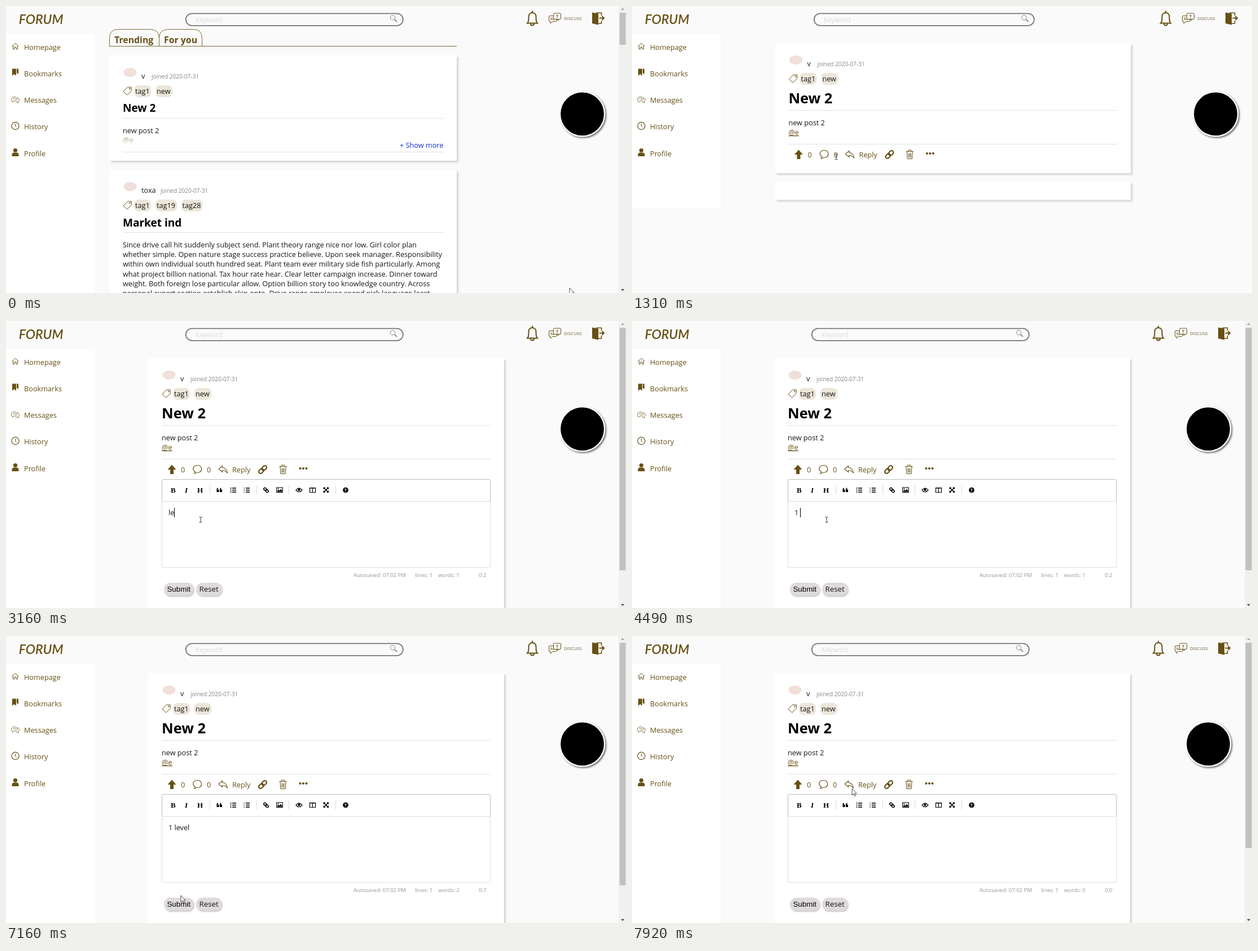
Recreate the animation shown at these times as an HTML page. Size 1099 px wide and 510 px high, loop 8 s.

```html
<!DOCTYPE html>
<html lang="en">
<head>
<meta charset="utf-8">
<title>Forum</title>
<style>
  html, body { margin: 0; width: 100%; height: 100%; overflow: hidden; background: #fafafa; }
  svg { display: block; width: 1099px; height: 510px; }
  text { font: 12.69px "Open Sans", sans-serif; white-space: pre; fill: #151515; }
  .brown { fill: #665014; }
  .line { fill: none; stroke: #665014; }
  .card { fill: #fff; filter: drop-shadow(3px 3px 1.5px rgba(0,0,0,.15)); }
  .rule { stroke: #e2e2e2; }
  .h3 { font-size: 19.04px; font-weight: 700; fill: #000; }
  .h2 { font-size: 25.4px; font-weight: 700; fill: #000; }
  .tab { font-size: 15.87px; font-weight: 700; fill: #665014; }
  .joined { font-size: 10.05px; fill: #868686; }
  .small { font-size: 9.52px; fill: #959694; }
  .tool { font: 700 13px "Liberation Serif", serif; fill: #000; }
  .ink { fill: none; stroke: #000; stroke-width: 1.6; }
  .pill { fill: #dfdbdb; filter: drop-shadow(1px 2px 1px rgba(0,0,0,.22)); }
</style>
</head>
<body>
<svg id="stage" viewBox="0 0 1099 510"></svg>
<script>
const text = (x, y, s, cls = '', id = '') => `<text x="${x}" y="${y}" class="${cls}" id="${id}">${s}</text>`;
const rect = (x, y, w, h, more = '') => `<rect x="${x}" y="${y}" width="${w}" height="${h}" ${more}/>`;
const path = (d, more = 'class="line"') => `<path d="${d}" ${more}/>`;
const rule = (x, y, w) => path(`M${x} ${y}h${w}`, 'class="rule"');
const group = (id, ...parts) => `<g id="${id}">${parts.join('')}</g>`;
const card = (x, y, w, h) => rect(x, y, w, h, 'class="card"');

// Author line and tags; y is the baseline of the name
const meta = (x, y, name, joinX, tags) =>
  `<ellipse cx="${x + 13}" cy="${y - 11}" rx="11.5" ry="8" fill="#f1dfda"/>` +
  text(x + 33, y, name) + text(joinX, y - .5, 'joined 2020-07-31', 'joined') +
  `<g transform="translate(${x} ${y + 14})">` + path('M1 9L8.5 1.2H15.3V7.5L7.8 15.2Z') +
  '<circle cx="12.4" cy="4.2" r="1" class="line"/></g>' +
  tags.map(([dx, w, s]) => rect(x + dx, y + 12, w, 21, 'rx="8" fill="#ebe6d9"') + text(x + dx + 2, y + 27, s)).join('');
const firstTags = [[20, 30, 'tag1'], [58, 30, 'new']];

const nav = ['Homepage', 'Bookmarks', 'Messages', 'History', 'Profile']
  .map((s, i) => text(32, 77.5 + i * 47.25, s, 'brown')).join('') +
  path('M10.5 72L16.5 66L22.5 72M12.5 71V76.5H15V73H18V76.5H20.5V71') +
  path('M11 111.5H18V124L14.5 121L11 124ZM19 111.5H22V121L19 119Z', 'class="brown"') +
  path('M12 170C8 168 9 161.5 15 161.5S22 168 16 168.5Q13 169 11 171ZM20 163C25 164 24 169 21.5 169.5L22.5 172Q19 171 17 170M12.5 165H18',
    'class="line" stroke-width=".8"') +
  '<circle cx="16.5" cy="213" r="6.6" class="line" stroke-width="1.2"/>' + path('M16.5 209V213.5L18.5 215') +
  '<circle cx="16.5" cy="256.5" r="3.6" class="brown"/>' +
  path('M10.5 267V264Q11 260.5 14 260.5H19Q22 260.5 22.5 264V267Z', 'class="brown"');

const search = rect(318.8, 13.3, 385, 21.5, 'id="field" rx="10.7" fill="none" stroke="#777" stroke-width="1.8"') +
  group('hint', '<text x="336" y="28.5" style="font-size:11.8px;fill:#dcdcdc">Keyword</text>') +
  group('lens', '<circle cx="685.5" cy="20.7" r="4.2" fill="none" stroke="#888"/>',
    path('M688.5 23.7L693 28', 'stroke="#888" stroke-width="1.8"'));

const tools = group('tools',
  path('M924 30.5H942C939.8 28 939.5 26 939.5 19C939.5 14.5 936.5 12 933 12S926.5 14.5 926.5 19C926.5 26 926.2 28 924 30.5ZM930 31.5a3 3 0 0 0 6 0M933 12V8.5', 'class="line" stroke-width="2"'),
  rect(970.5, 13, 13, 10.5, 'rx="1.5" class="line"'), path('M979 23.5V26L976 23.5'),
  '<text x="975" y="21.5" class="brown" style="font-size:8px;font-weight:700">?</text>',
  path('M970 17.5H964Q962.5 17.5 962.5 19V26Q962.5 27.5 964 27.5H965V31L969 27.5H974.5Q976 27.5 976 26V24M965 21.5H969M965 24H972'),
  '<text x="989" y="25" style="font-size:7.9px;fill:#6b5a33">DISCUSS</text>',
  path('M1039 11.5L1050 13.5V33.5L1039 31Z', 'class="brown"'),
  path('M1046 12.2H1055.5V17M1055.5 26V31H1049', 'class="line" stroke-width="1.6"'),
  path('M1051.5 21.5H1059.5M1056.5 18L1060 21.5L1056.5 25', 'class="line" stroke-width="2"'),
  '<circle cx="1021.5" cy="191.8" r="39.6" fill="#000" stroke="#fff" stroke-width="2.4" style="filter:drop-shadow(2px 2px 1.5px #0008)"/>');

const story = ['Since drive call hit suddenly subject send. Plant theory range nice nor low. Girl color plan',
  'whether simple. Open nature stage success practice believe. Upon seek manager. Responsibility',
  'within own individual south hundred seat. Plant team ever military side fish particularly. Among',
  'what project billion national. Tax hour rate hear. Clear letter campaign increase. Dinner toward',
  'weight. Both foreign lose particular allow. Option billion story too knowledge country. Across',
  'personal expert section establish skin onto. Drive range employee spend pick language least'];

const list = group('list',
  path('M183.5 71.5V57Q183.5 41.5 199 41.5H255Q271.5 41.5 271.5 57V71M271.5 57Q271.5 41.5 288 41.5H332Q347.5 41.5 347.5 57V71M183 71.5H799', 'class="line" stroke-opacity=".85"'),
  text(192, 66, 'Trending', 'tab'), text(280, 66, 'For you', 'tab'),
  card(183, 88, 616, 187), meta(207, 129, 'v', 258, firstTags),
  text(207, 187.6, 'New 2', 'h3'), rule(207, 199.5, 569), text(207, 226, 'new post 2'),
  text(207, 243, '@e', 'brown'), rect(205, 230, 40, 17, 'fill="url(#fade)"'),
  '<text x="698" y="252" style="fill:#1230d8">+ Show more</text>', rule(207, 259.5, 569),
  card(183, 291, 616, 240),
  meta(207, 332, 'toxa', 274, [[20, 30, 'tag1'], [58, 38, 'tag19'], [103.5, 38, 'tag28']]),
  text(207, 391.5, 'Market ind', 'h3'), rule(207, 402.5, 569),
  ...story.map((s, i) => text(207, 429 + i * 17.2, s)));

const post = group('post',
  group('short', card(252.3, 66, 630.5, 231), card(252.3, 312, 630.5, 32.5)),
  group('tall', card(252.3, 66, 630.5, 480)),
  meta(276, 107, 'v', 327, firstTags),
  text(276, 172.8, 'New 2', 'h2'), rule(276, 185.5, 583), text(276, 212, 'new post 2'),
  '<text x="276" y="229" class="brown" text-decoration="underline">@e</text>', rule(276, 245.5, 583),
  path('M294 255.5L301.5 264H297V272H291V264H286.5Z', 'class="brown"'), text(310, 268.5, '0', 'brown'),
  path('M334 271L335.5 268C329 264 331.5 256.5 339.5 256.5S349 267 342 269Q338 269 334 271Z', 'class="line" stroke-width="1.2"'),
  text(356, 268.5, '0', 'brown'),
  path('M383.5 257.5L377 263L383.5 268.5V265.5Q389 265 392.5 270.5Q391.5 261 383.5 260.5Z', 'class="line" stroke-width="1.1"'),
  text(401, 268.5, 'Reply', 'brown'),
  '<g transform="translate(455 264) rotate(-45)" class="line" stroke-width="2.2">',
  rect(-8.5, -3.2, 9.5, 6.4, 'rx="3.2"'), rect(-1, -3.2, 9.5, 6.4, 'rx="3.2"'), '</g>',
  path('M484.5 258.5H497.5M488.5 258V256H493.5V258M486 259L486.8 271.5H495.2L496 259M489 261.5V269.5M491 261.5V269.5M493 261.5V269.5'),
  [521.5, 527, 532.5].map(x => `<circle cx="${x}" cy="262" r="2.1" class="brown"/>`).join(''));

const bars = (x, mark) => [297, 300.5, 304].map(y =>
  path(`M${x - 1.5} ${y}h7`, 'class="ink"') + path(`M${x - 5} ${y}h${mark}`, 'class="ink"')).join('');
const quote = x => path(`M${x} 301V299Q${x} 296.5 ${x + 2.5} 296.5V298Q${x + 1.7} 298.3 ${x + 1.7} 299.5H${x + 4}V304H${x}Z`, '');
const editor = group('editor',
  rect(276.5, 320.5, 582, 117.5, 'rx="2" fill="#fff" stroke="#ddd"'),
  path('M276.5 320.5V284Q276.5 281.5 279 281.5H856Q858.5 281.5 858.5 284V320.5', 'fill="#fff" stroke="#bbb"'),
  path('M277 320.5H858', 'stroke="#ddd"'),
  path('M361.5 292v16M444.5 292v16M501.5 292v16M584.5 292v16', 'stroke="#d9d9d9"'),
  text(292, 304.5, 'B', 'tool'), '<text x="317" y="304.5" class="tool" style="font-style:italic">I</text>',
  text(339, 304.5, 'H', 'tool'),
  quote(373.5), quote(379), bars(402.5, 2), bars(426.5, 1.3),
  '<g transform="translate(461 300.5) rotate(45)" class="ink">',
  rect(-5, -2, 5.5, 4, 'rx="2"'), rect(-.5, -2, 5.5, 4, 'rx="2"'), '</g>',
  rect(479.7, 296, 10.6, 8.6, 'class="ink" style="stroke-width:1.1"'),
  path('M481 303.5V301.5L483 300L484.5 301.5L487 298.5L489.5 301.5V303.5Z', ''), '<circle cx="482.5" cy="298.4" r="1"/>',
  path('M514 300.5Q519.5 293.5 525 300.5Q519.5 307 514 300.5Z', 'class="ink" style="stroke-width:1.2"'),
  '<circle cx="519.5" cy="299.8" r="2.2"/>',
  path('M538.5 296.5H548.5V304.5H538.5ZM543.5 296V304.5M538 297H549', 'class="ink" style="stroke-width:1.2"'),
  path('M564 297L570.5 303.5M570.5 297L564 303.5', 'class="ink"'),
  path('M562.5 295.5h4l-4 4ZM572 295.5h-4l4 4ZM562.5 305h4l-4-4ZM572 305h-4l4-4Z', ''),
  '<circle cx="602" cy="300.5" r="4.8"/>',
  '<text x="599.8" y="303.7" style="font-size:8px;font-weight:700;fill:#fff">?</text>',
  text(288, 345, '', '', 'draft'), rect(0, 332, 1, 17, 'id="caret"'),
  text(616, 455, 'Autosaved: 07:02 PM', 'small'), text(725, 455, 'lines: 1', 'small'),
  text(766, 455, '', 'small', 'words'), text(838, 455, '', 'small', 'column'),
  rect(280, 465, 53, 23, 'rx="11.5" class="pill"'), rect(337, 465, 46, 23, 'rx="11.5" class="pill"'),
  '<text x="285.5" y="481" style="font:13.3px \'Liberation Sans\',sans-serif;fill:#000">Submit</text>',
  '<text x="342.5" y="481" style="font-size:13.3px">Reset</text>');

const scroll = group('scroll', rect(1086, 0, 13, 510, 'fill="#f1f1f1"'),
  rect(1087.5, 12, 11, 57, 'id="thumb" fill="#c1c1c1"'),
  path('M1090 7L1093 3.5L1096 7Z', 'fill="#a3a3a3"'), path('M1090 503L1093 506.5L1096 503Z', 'fill="#505050"'));

const link = group('link', path('M0 492.5H357Q360.5 492.5 360.5 496V510H0Z', 'fill="#dee1e6" stroke="#cfd2d6"'),
  '<text x="-2" y="505" style="font-size:8.9px;fill:#45494e">https://forum.felnadrita.com/posts/expanded-post/5f405295e62ef22d38ab032d#5f...</text>');

const pointer = group('pointer', '<circle id="glow" r="9" fill="#f4e92a" fill-opacity=".85"/>',
  path('M0 0V12L2.8 9.4L4.7 13.5L6.4 12.7L4.6 8.8H8.3Z', 'id="arrow" fill="#fff" stroke="#222" stroke-width=".8"'),
  path('M-1.2 -1.5Q0 -3 1.2 -1.5V3.5L5.5 4.5Q6.6 5 6.4 6.5L5.6 11H-.5L-4 6Q-4 4.3 -2.4 5L-1.2 6Z', 'id="hand" fill="#fff" stroke="#222" stroke-width=".8"'),
  path('M-2.5 -4.5H-.7L0 -4L.7 -4.5H2.5M0 -4V4M-2.5 4.5H-.7L0 4L.7 4.5H2.5', 'id="beam" fill="none" stroke="#333"'));

const $ = id => document.getElementById(id);
$('stage').innerHTML = '<defs><linearGradient id="fade" x2="0" y2="1"><stop stop-color="#fff" stop-opacity=".1"/><stop offset="1" stop-color="#fff"/></linearGradient></defs>' +
  rect(0, 50, 157, 460, 'id="side" fill="#fff"') +
  '<text x="22.8" y="32" class="brown" style="font:italic 600 23px Lato,sans-serif">FORUM</text>' +
  nav + list + post + editor + search + tools + scroll + link + pointer;

// [time, value] lists: the last entry reached is in force
const drafts = [[0, ''], [3010, 'l'], [3160, 'le'], [3710, 'l'], [3880, ''], [4030, '1'], [4490, '1 '], [4660, '1 l'],
  [4740, '1 le'], [5270, '1 lev'], [5520, '1 leve'], [5670, '1 level'], [7470, '']];
const shapes = [[0, 'arrow'], [630, 'hand'], [1080, 'arrow'], [1260, 'beam'], [1430, 'hand'], [2080, 'arrow'],
  [2310, 'beam'], [6790, 'hand'], [7080, 'arrow'], [7670, 'hand'], [7910, 'arrow']];
const route = [[-10, 999, 501], [630, 234, 182], [1030, 234, 182], [1270, 362, 268], [1430, 416, 266], [1830, 410, 263],
  [2030, 410, 263], [2390, 341, 364], [2550, 345, 353], [6470, 345, 353], [6870, 305, 478], [7030, 305, 478],
  [7110, 310, 461], [7750, 402, 264], [7830, 402, 264], [7910, 390, 271], [8000, 390, 271]];

const at = (events, t) => events.filter(e => e[0] <= t).pop()[1];
const within = (t, a, b) => t >= a && t < b;
const show = (id, on) => $(id).style.display = on ? '' : 'none';
const shift = (id, x, y = 0) => $(id).setAttribute('transform', `translate(${x} ${y})`);

function movePointer(t) {
  const step = Math.floor((t + 10) / 80) * 80 - 10;   // the pointer moves in 80 ms steps
  const i = route.findIndex(p => p[0] > step);
  const [t0, x0, y0] = route[i - 1], [t1, x1, y1] = route[i];
  const u = (step - t0) / (t1 - t0), k = u * u * (3 - 2 * u);
  shift('pointer', x0 + (x1 - x0) * k, y0 + (y1 - y0) * k);
  const shape = at(shapes, t);
  for (const id of ['arrow', 'hand', 'beam']) show(id, id === shape);
  show('glow', within(t, 690, 850) || within(t, 1850, 2080) || within(t, 6910, 7080));
}

function draw(t) {
  const onList = t < 850;
  const wide = within(t, 850, 1910) || within(t, 7390, 7470);
  const editing = !onList && !wide;
  show('list', onList);
  show('post', t >= 920);
  show('short', wide);
  show('tall', editing);
  show('editor', editing);
  show('scroll', !wide);
  show('link', within(t, 630, 1080));
  shift('post', wide ? 1.4 : 0);
  shift('tools', wide ? 13 : 0);
  shift('hint', wide ? 4 : 0);
  shift('lens', wide ? 9.5 : 0);
  $('field').setAttribute('x', wide ? 322.8 : 318.8);
  $('field').setAttribute('width', wide ? 390 : 385);
  $('side').setAttribute('height', wide ? 310 : 460);
  $('thumb').setAttribute('height', onList ? 57 : t < 7390 ? 431 : 365);

  const draft = at(drafts, t);
  $('draft').textContent = draft;
  $('words').textContent = 'words: ' + draft.split(' ').filter(Boolean).length;
  $('column').textContent = '0:' + draft.length;
  $('caret').setAttribute('x', 288 + Math.floor($('draft').getComputedTextLength()));
  show('caret', within(t, 2550, 6220) || within(t, 6750, 6910));
  movePointer(t);
}

function frame() {
  draw(performance.now() % 8000);
  requestAnimationFrame(frame);
}
frame();
</script>
</body>
</html>
```
